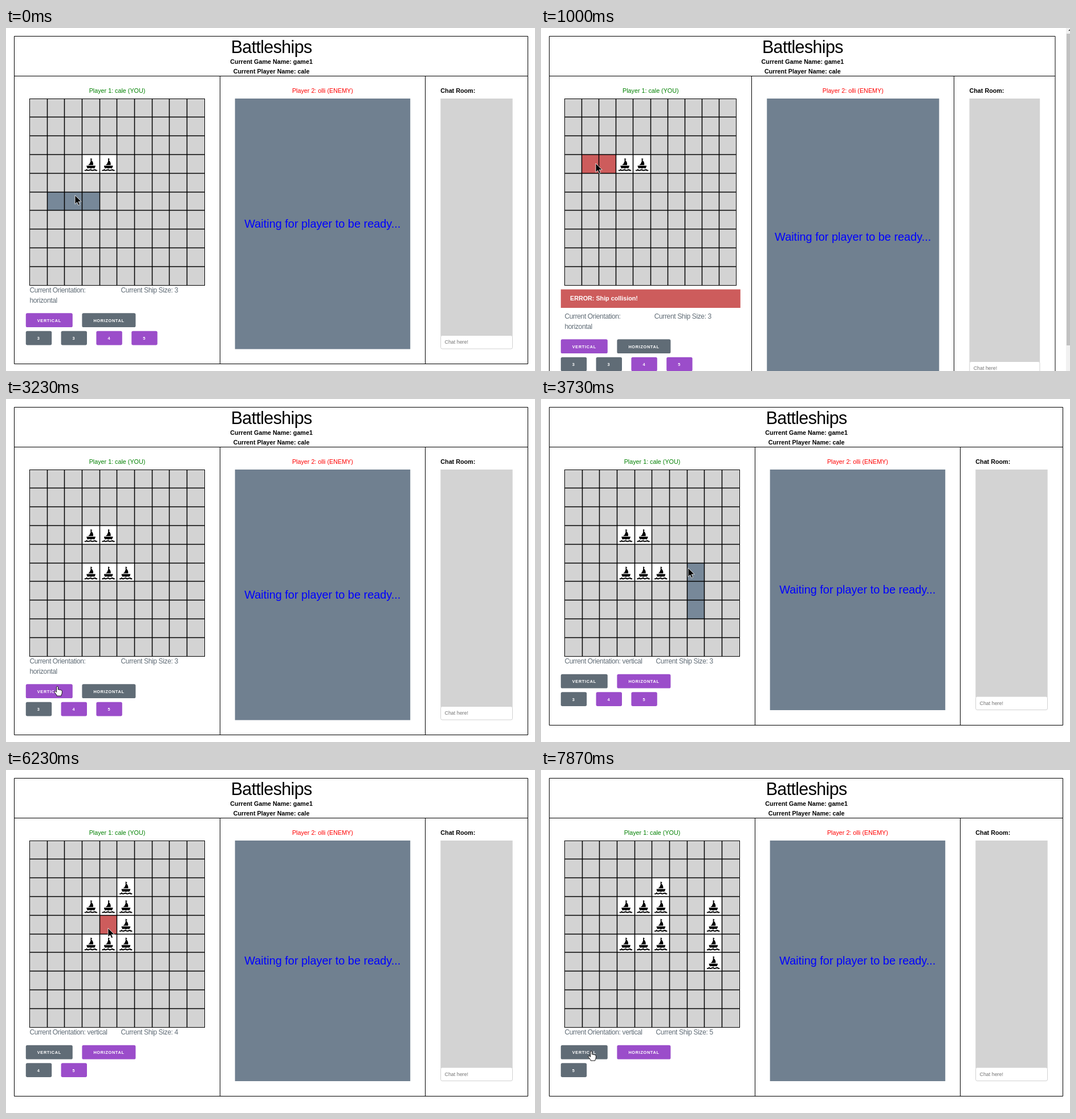
An HTML page for the animation above (8000 ms loop, 928 by 603 pixels).

```html
<!DOCTYPE html>
<html lang="en">
<head>
<meta charset="utf-8">
<title>Battleships</title>
<style>
  html, body { margin: 0; height: 100%; overflow: hidden; background: #fff; }
  svg { display: block; width: 928px; height: 603px; font: 10.75px "Liberation Sans", Arial, sans-serif; }
  text { white-space: pre; }
  .mid { text-anchor: middle; }
  .bold { font-weight: bold; }
  .title { font-size: 30.5px; letter-spacing: -.667px; }
  .info { font-size: 12px; letter-spacing: -.36px; fill: #606c76; }
  .button { font-size: 7.33px; font-weight: bold; letter-spacing: .667px; fill: #fff; }
  .wait { font-size: 19.9px; fill: #00f; }
  .hint { font-size: 8.89px; fill: #757575; }
</style>
</head>
<body>
<svg id="stage" viewBox="0 0 928 603">
  <defs>
    <g id="ship">
      <path d="M-.4-10.5L2.6-8.8L.8-7.2Q4.8-3.5 4.2 1.6H-5Q-1.6 0-.9-4H-.4zM-7.6 2.8H8.2Q7.6 6 6 7.6Q3 6.4 .2 7.8Q-3 6.4-5.6 7.6Q-7.2 6-7.6 2.8z"/>
      <path d="M-11 10.9q2.4 1 3.8-1q1.6 2 3.7 1t3.7-1q1.6 2 3.7 1t3.7-1q1.2 2 3.6 1" fill="none" stroke="#000" stroke-width="2"/>
    </g>
    <path id="arrow" d="M0 0V15.6L3.6 12.2L6 17.6L8.5 16.5L6.2 11.2H11.2Z" stroke="#fff" stroke-width=".8"/>
    <path id="hand" d="M-1.4 1Q0-1 1.4 1V6Q3 5 4 6.4Q5.6 5.6 6.4 7Q8.4 6.6 8.4 8.6V12Q8 14 7 15.6V17H-1V15.6L-5 10.4Q-5.4 8-3.2 8.6L-1.4 10.4Z" fill="#fff" stroke="#000" stroke-width=".9"/>
  </defs>
  <g id="view"></g>
</svg>
<script>
const LOOP = 8000, HOVER_LAG = 40;
const LEFT = 14.5, GRID_X = 41.5, GRID_Y = 124.5, ROW = 32.8, PAD = 26.8, SIDE = 10;
const GREY = '#606c76', PURPLE = '#9b4dca', RED = '#cd5c5c';

const CLICKS = [1000, 2430, 3250, 4500, 5500, 6430, 7570];
// pointer moves: start, end, x, y, sideways and downward bow of the curve
const MOVES = [
  [-100, 0, 121, 294],
  [30, 600, 96, 238, 68, 96],
  [1400, 1930, 134, 310],
  [2070, 2130, 145, 319],
  [2930, 3200, 90, 505],
  [3280, 3730, 258, 297, 40],
  [3900, 4230, 238, 412],
  [4700, 5070, 200, 222, 14],
  [5970, 6230, 179, 278],
  [6800, 7300, 295, 240, 0, 40],
  [7570, 7870, 88, 494]];

function pointer(t) {
  let x = 40, y = 300;
  for (const [start, end, toX, toY, bowX = 0, bowY = 0] of MOVES) {
    if (t < start) break;
    const s = 1 - Math.max(0, (end - t) / (end - start)) ** 1.5, bow = 4 * s * (1 - s);
    x += (toX - x) * s + bowX * bow;
    y += (toY - y) * s + bowY * bow;
  }
  return [x, y];
}

// horizontal measures; an error makes the page overflow and a scrollbar narrows it
function columns(game) {
  const right = game.error ? 902 : 915.5, width = right - LEFT;
  const split1 = LEFT + width * .4, split2 = LEFT + width * .8;
  return { right, split1, split2, cell: (split1 - PAD - GRID_X) / SIDE };
}

// the cells a ship would take at the pointer, up to the first obstacle
function aim(game, [x, y]) {
  const col = Math.floor((x - GRID_X) / columns(game).cell), row = Math.floor((y - GRID_Y) / ROW);
  const cells = [];
  let problem = '';
  for (let i = 0; i < game.fleet[0] && !problem; i++) {
    const c = col + (game.vertical ? 0 : i), r = row + (game.vertical ? i : 0);
    if (Math.min(c, r) < 0 || Math.max(c, r) >= SIDE) problem = 'Ship placed out of bounds!';
    else if (game.ships.has(c + ',' + r)) problem = 'Ship collision!';
    else cells.push(c + ',' + r);
  }
  return { cells, problem };
}

function play(t) {
  const game = { ships: new Set(['3,3', '4,3']), fleet: [3, 3, 4, 5], vertical: false, error: '' };
  for (const click of CLICKS) {
    if (click > t) break;
    const spot = pointer(click);
    if (spot[1] > GRID_Y + SIDE * ROW) { game.vertical = true; continue; }
    const { cells, problem } = aim(game, spot);
    game.error = problem;
    if (!problem) {
      cells.forEach(key => game.ships.add(key));
      game.fleet.shift();
    }
  }
  return game;
}

const rect = (x, y, right, bottom, fill, extra = '') =>
  `<rect x="${x}" y="${y}" width="${right - x}" height="${bottom - y}" fill="${fill}" ${extra}/>`;
const text = (x, y, s, cls = '', fill = '') =>
  `<text x="${x}" y="${y}" class="${cls}" ${fill && `fill="${fill}"`}>${s}</text>`;
const button = (x, y, width, label, active) =>
  rect(x, y, x + width, y + 24.8, active ? GREY : PURPLE, 'rx="2.67"') + text(x + 20, y + 15.3, label, 'button');

function board(game, cell, hover) {
  const gridX = i => Math.round(GRID_X - .5 + i * cell) + .5;
  const gridY = i => Math.floor(GRID_Y - .5 + i * ROW) + .5;
  const hoverFill = hover.problem ? RED : '#789';
  let out = '', lines = '';
  for (let r = 0; r < SIDE; r++) for (let c = 0; c < SIDE; c++) {
    const key = c + ',' + r, ship = game.ships.has(key);
    const fill = ship ? '#fff' : hover.cells.includes(key) ? hoverFill : '#d3d3d3';
    out += rect(gridX(c), gridY(r), gridX(c + 1), gridY(r + 1), fill);
    if (ship) out += `<use href="#ship" x="${GRID_X + (c + .5) * cell}" y="${GRID_Y + (r + .5) * ROW}"/>`;
  }
  for (let i = 1; i < SIDE; i++)
    lines += `M${gridX(i)} ${gridY(0)}V${gridY(SIDE)}M${gridX(0)} ${gridY(i)}H${gridX(SIDE)}`;
  return out + `<path d="${lines}" stroke="#000" stroke-width="1.5"/>` +
    rect(gridX(0), gridY(0), gridX(SIDE), gridY(SIDE), 'none', 'stroke="#000"');
}

function draw(t) {
  const game = play(t), { error, fleet, vertical } = game, size = fleet[0];
  const { right, split1, split2, cell } = columns(game);
  const shift = error ? 46 : 0, drop = shift - (vertical ? 17.5 : 0);
  const end = 564.5 + drop, buttons = 501.3 + drop, bottom = Math.round(590 + drop) + .5;
  const middle = (LEFT + right) / 2 + .6, enemy = (split1 + split2) / 2, chat = split2 + 27;
  const divider = x => `M${Math.round(x - .1) + .5} 84.5V${bottom}`;

  let out = `<path d="M${LEFT} 14.5H${right}V${bottom}H${LEFT}ZM${LEFT} 84.5H${right}` +
    `${divider(split1)}${divider(split2)}" fill="none" stroke="#000"/>`;
  out += text(middle, 44, 'Battleships', 'mid title');
  out += text(middle, 63, 'Current Game Name: game1', 'mid bold');
  out += text(middle, 79.5, 'Current Player Name: cale', 'mid bold');

  out += text((LEFT + split1) / 2 + .3, 114, 'Player 1: cale (YOU)', 'mid', 'green');
  out += board(game, cell, aim(game, pointer(t - HOVER_LAG)));
  if (error) {
    out += rect(34.8, 459.5, split1 - 19.7, 492, RED);
    out += text(51, 479.2, 'ERROR: ' + error, 'bold', '#fff');
  }
  out += text(41.4, 465.3 + shift, 'Current Orientation:' + (vertical ? ' vertical' : ''), 'info');
  if (!vertical) out += text(41.4, 483 + shift, 'horizontal', 'info');
  out += text(GRID_X + cell * 5.22, 465.3 + shift, 'Current Ship Size: ' + size, 'info');
  out += button(34.8, buttons, 82, 'VERTICAL', vertical);
  out += button(133.4, buttons, 94, 'HORIZONTAL', !vertical);
  fleet.forEach((n, i) => out += button(34.8 + i * 61.8, buttons + 31.4, 45.4, n, n === size));

  out += text(enemy + .3, 114, 'Player 2: olli (ENEMY)', 'mid', 'red');
  out += rect(split1 + PAD, 124, split2 - PAD + .7, end, '#708090');
  out += text(enemy + .2, 350.8 + drop / 2, 'Waiting for player to be ready...', 'mid wait');

  out += text(chat, 114, 'Chat Room:', 'bold');
  out += rect(chat, 124, right - PAD, end - 23, '#d3d3d3');
  out += rect(chat + .3, end - 24, right - PAD - .2, end - .5, '#fff', 'rx="2.67" stroke="#d1d1d1"');
  out += text(chat + 7.2, end - 9.3, 'Chat here!', 'hint');

  if (error) {
    out += rect(921, 0, 928, 603, '#f1f1f1') + rect(922, 10, 928, vertical ? 573 : 558, '#c1c1c1');
    out += '<path d="M925 5l3-3 3 3z" fill="#505050"/>';
  }
  const [x, y] = pointer(t);
  const onButton = x > 35 && x < 117 && y > buttons && y < buttons + 25;
  return out + `<use href="#${onButton ? 'hand' : 'arrow'}" x="${x}" y="${y}"/>`;
}

const view = document.getElementById('view');
const start = performance.now();
let shown = '';
function tick() {
  const next = draw((performance.now() - start) % LOOP);
  if (next !== shown) view.innerHTML = shown = next;
  requestAnimationFrame(tick);
}
tick();
</script>
</body>
</html>
```
